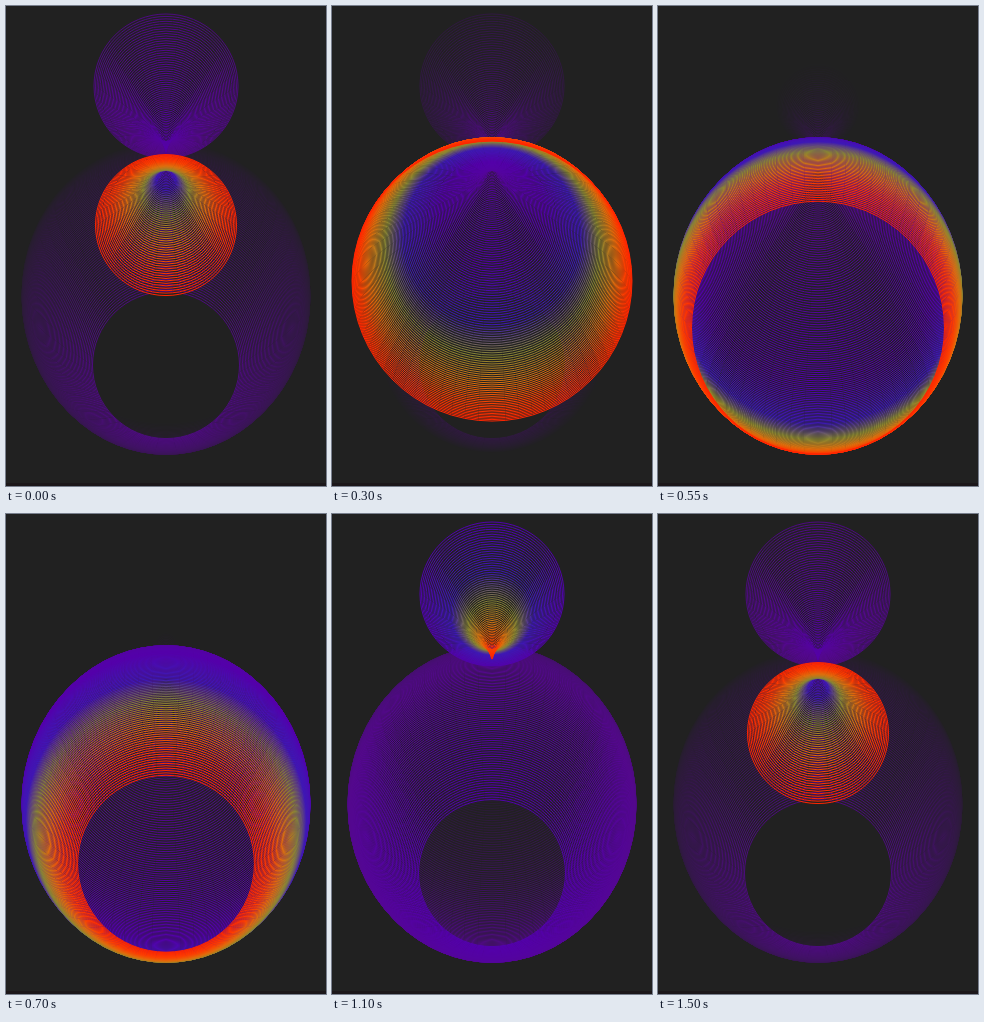
An HTML page with a canvas that plays this animation: 320x480 px, repeating every 1.55 s.

```html
<!DOCTYPE html>
<html lang="en">
<head>
<meta charset="utf-8">
<title>Ring trail</title>
<style>
  html, body { margin: 0; height: 100%; overflow: hidden; background: #212121; }
  canvas { display: block; }
</style>
</head>
<body>
<canvas id="stage" width="320" height="480"></canvas>
<script>
const ctx = document.getElementById('stage').getContext('2d');
const RINGS = 300, STEP_MS = 50, STEPS = 31, RINGS_PER_STEP = 10;

// Trail colour by age, where 1 is one full cycle: [age, r, g, b]
const ramp = [
  [0, 255, 38, 0],
  [0.035, 255, 62, 0],
  [0.07, 225, 110, 12],
  [0.115, 138, 136, 50],
  [0.16, 62, 25, 182],
  [0.24, 84, 0, 172],
  [0.45, 84, 8, 142],
  [0.65, 55, 22, 80],
  [0.8, 33, 33, 33]
];

function colorAt(age) {
  const k = ramp.findIndex(stop => stop[0] > age);
  const [a, ...from] = ramp[k - 1];
  const [b, ...to] = ramp[k];
  const f = (age - a) / (b - a);
  return `rgb(${from.map((v, j) => Math.round(v + (to[j] - v) * f))})`;
}

// The centre slides down evenly while the radius swings through one sine wave.
function drawRing(index, color) {
  const u = index % RINGS / RINGS;
  ctx.strokeStyle = color;
  ctx.beginPath();
  ctx.arc(160, 80 + 280 * u, 72 - 72 * Math.sin(2 * Math.PI * u), 0, 2 * Math.PI);
  ctx.stroke();
}

function draw(step) {
  ctx.fillStyle = '#212121';
  ctx.fillRect(0, 0, 320, 480);
  ctx.fillStyle = '#1c171a';
  ctx.fillRect(0, 477, 320, 3);
  const head = RINGS / 2 - 1 + step * RINGS_PER_STEP;
  for (let back = RINGS * 0.8 - 1; back >= 0; back--) {
    drawRing(head - back + RINGS, colorAt(back / RINGS));
  }
}

let shown = -1;
function tick() {
  const step = Math.floor(performance.now() / STEP_MS) % STEPS;
  if (step !== shown) draw(shown = step);
  requestAnimationFrame(tick);
}
tick();
</script>
</body>
</html>
```
